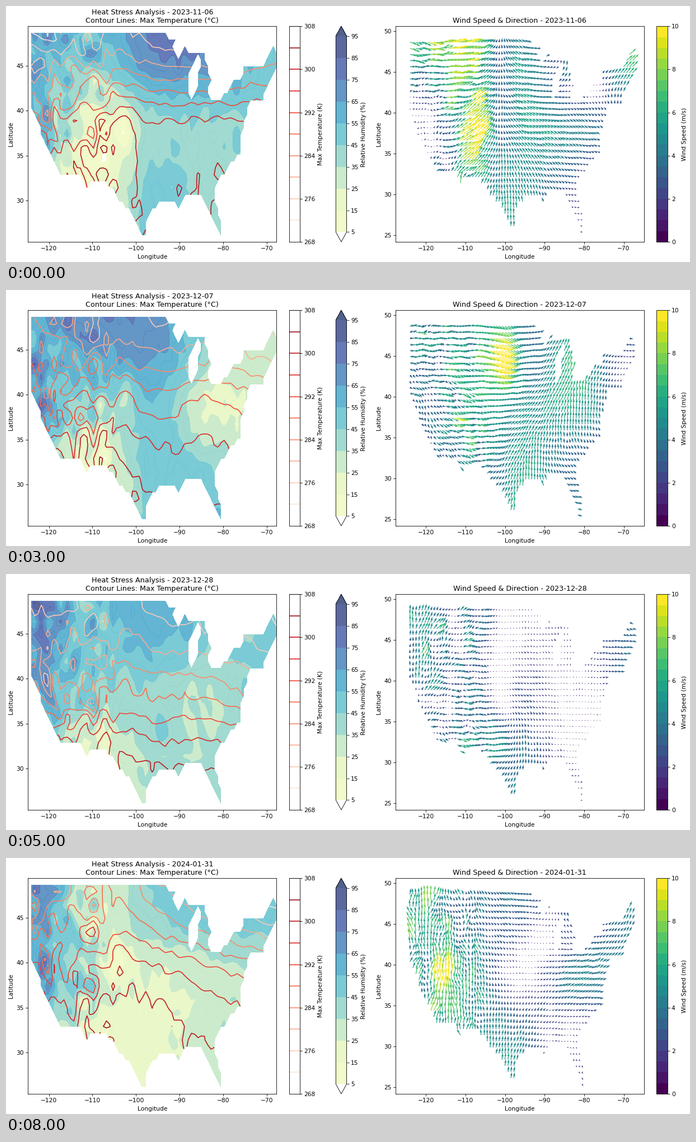
These frames come from a looping animation (1222 px wide and 458 px high, 9 s). A matplotlib script:

```python
import numpy as np
import matplotlib.pyplot as plt
from matplotlib.animation import FuncAnimation
from matplotlib.cm import ScalarMappable
from matplotlib.colors import BoundaryNorm, ListedColormap, Normalize
from matplotlib.path import Path

W, H, DPI = 1222, 458, 76.375

# Regular 0.75 degree grid, north to south
COLS, ROWS = np.arange(77.0), np.arange(33.0)
lon, lat = -124.77 + 0.75 * COLS, 49.4 - 0.75 * ROWS
LON, LAT = np.meshgrid(lon, lat)

# Outlines in grid steps (column, row)
LAND = [(1, 1), (42, 1), (45, 2), (44, 3), (46, 4.5), (48, 3), (49, 4), (54, 4),
        (56, 8), (55, 10.5), (58, 11), (63, 8), (65, 8), (66, 6), (72, 6), (75, 3),
        (76, 4), (76, 6), (73, 9), (72, 11), (68, 11), (65, 17), (65, 19), (57, 24),
        (59, 29), (59, 32), (56, 28), (53, 25.5), (48, 25.5), (46, 27), (41, 26),
        (36, 29), (36, 31), (34.5, 31), (33, 29), (28, 26), (23, 23), (18, 24),
        (15, 22), (10, 22), (4, 16), (1, 12.5), (1, 2)]
LAKE = [(51.6, 4.5), (52.5, 5), (50.5, 10.5), (49.6, 10.5), (49.6, 7.5)]

nodes = np.array([(c, r) for r in ROWS for c in COLS])
land = Path(LAND)
inside = land.contains_points(nodes, radius=0.2) | land.contains_points(nodes, radius=-0.2)
inside &= ~Path(LAKE).contains_points(nodes)
inside = inside.reshape(LON.shape)


def weights(x, knots):
    """Cubic convolution weights from evenly spaced knots to x."""
    t = abs((x[:, None] - knots) / (knots[1] - knots[0]))
    w = np.where(t < 1, 1.5 * t**3 - 2.5 * t**2 + 1,
                 np.where(t < 2, -0.5 * t**3 + 2.5 * t**2 - 4 * t + 2, 0))
    return w / w.sum(1, keepdims=True)


WX, WY = weights(lon, np.linspace(-122, -70, 5)), weights(lat, np.linspace(47, 30, 3))
NX, NY = weights(COLS, np.arange(-2, 82, 2)), weights(ROWS, np.arange(-2, 38, 2))


def smooth(*rows):
    return WY @ np.array(rows, float) @ WX.T


def rough(rng):
    return NY @ rng.normal(size=(NY.shape[1], NX.shape[1])) @ NX.T


def blob(x, y, r):
    return np.exp(-((LON - x) ** 2 + (LAT - y) ** 2) / r**2)


# Mountain relief shared by all days
west = 1 / (1 + np.exp((LON + 105.5) / 0.9))
ridge = np.exp(-((LON + 118.6 + 0.75 * (LAT - 37)) / 0.8) ** 2 - ((LAT - 38.6) / 2.6) ** 4)
relief = rough(np.random.default_rng(4)) * west
north = (LAT - 28) / 10

days = {}


def day(n, date, hum, warmth, u, v, spot, gust):
    """Rows run north to south, columns west to east; warmth is north, mid, eastward tilt."""
    x, y, amp = spot
    hum = smooth(*hum) + amp * blob(x, y, 2.2)
    top, mid, tilt = warmth
    temp = (WY @ [top, mid, 300.5])[:, None] + tilt * north * (LON + 96) / 10
    temp = temp - 4.5 * west * north.clip(0, 1) - (0.07 + 0.08 * north) * (hum - 35)
    gx, gy, gu, gv = gust
    g = blob(gx, gy, 3.5)
    days[n] = date, [hum, temp, smooth(*u) + gu * g, smooth(*v) + gv * g]


def between(n, date):
    a, b = days[n - 1][1], days[n + 1][1]
    days[n] = date, [(p + q) / 2 for p, q in zip(a, b)]


day(0, "2023-11-06",
    hum=([62, 50, 75, 75, 50], [55, 18, 42, 42, 48], [25, 14, 50, 40, 50]),
    warmth=(285, 298, 0),
    u=([6, 8, -4, 0, 5], [-1, 5, -4, -4, -2], [3, 3, -1, -2, 0]),
    v=([0, 2, 3, -4, 5], [0, 3, 3, 2, 2], [2, 4, 5, 1, -2]),
    spot=(-102.5, 38, -22), gust=(-108, 38, 4, 4))

day(1, "2023-11-17",
    hum=([72, 28, 14, 28, 52], [62, 38, 10, 38, 55], [35, 25, 30, 40, 50]),
    warmth=(286, 294, -3),
    u=([1, 2, 1, 5, 4], [0, 3, -2, 1, 2], [2, 3, 0, 1, 1]),
    v=([3, 2, 1, -1, -3], [5, 2, 3, -2, -3], [3, 3, 0, -4, -4]),
    spot=(-100.6, 31.8, 50), gust=(-120, 39.5, 1, 4))

day(3, "2023-12-07",
    hum=([62, 72, 70, 45, 35], [60, 38, 55, 22, 28], [22, 14, 50, 50, 45]),
    warmth=(285, 294, -2),
    u=([4, 5, 4, 2, 3], [2, 6, 4, 1, -1], [2, 4, 1, -3, -3]),
    v=([0, 0, -1, 6, 0], [-2, -2, 3, 6, 3], [-2, -1, 6, 2, 1]),
    spot=(-102, 40, -18), gust=(-101.5, 45, 5, -5))

day(4, "2023-12-18",
    hum=([80, 42, 48, 45, 50], [65, 28, 20, 26, 55], [40, 20, 28, 30, 50]),
    warmth=(282, 290, -3),
    u=([0, 3, 2, 4, 4], [1, 3, 1, 4, 5], [2, 2, 1, 4, 1]),
    v=([4, 1, 3, 2, 2], [5, 2, 5, -1, -3], [3, 1, 2, -3, -5]),
    spot=(-103.3, 39.7, -20), gust=(-121, 41, 0, 4))

day(6, "2024-01-07",
    hum=([64, 60, 78, 58, 42], [50, 62, 66, 42, 45], [14, 18, 45, 45, 42]),
    warmth=(282, 287, 0),
    u=([2, 3, -3, -3, 3], [0, 4, -5, -4, 0], [2, 6, 0, -6, -4]),
    v=([4, 1, -1, 1, -4], [1, -3, -3, 2, 3], [-3, -3, 6, 3, 1]),
    spot=(-94, 34.2, 20), gust=(-102, 33, 6, -1))

day(8, "2024-01-31",
    hum=([68, 28, 45, 52, 52], [56, 32, 24, 30, 38], [35, 20, 22, 32, 42]),
    warmth=(285, 296, -2),
    u=([0, -1, -3, 1, 2], [1, -1, 0, 4, 3], [2, 0, 1, 1, 1]),
    v=([6, 3, 1, -3, 4], [5, 5, 1, 2, 2], [4, 5, 4, -1, -2]),
    spot=(-104, 40.3, -20), gust=(-115, 38, 0, 5))

between(2, "2023-11-27")
between(5, "2023-12-28")
between(7, "2024-01-18")


def weather(n):
    """Date, humidity, temperature and wind of one day, with local detail."""
    date, (hum, temp, u, v) = days[n]
    rng = np.random.default_rng(100 + n)
    r = [rough(rng) for _ in days[n][1]]
    hum = hum + r[0] * (2 + 5 * west) - 5 * relief + 14 * ridge
    temp = temp + r[1] * (0.5 + 0.9 * west) + 2.2 * relief - 6 * ridge
    u, v = (f + e * (0.4 + 0.9 * west) for f, e in zip((u, v), r[2:]))
    hide = ~inside
    return date, np.ma.array(hum.clip(1, 99), mask=hide), np.ma.array(temp, mask=hide), u, v


HUM_LEVELS = np.arange(5, 100, 5)
TEMP_LEVELS = np.arange(268, 309, 4)
blues, reds = plt.get_cmap("YlGnBu"), plt.get_cmap("Reds")
speeds = plt.get_cmap("viridis", 20)


def pale(x):
    return tuple(0.3 + 0.7 * c for c in blues(x)[:3])


# Neighbouring five-percent bands share a tone
tones = [max(0.13, (k + 0.5) / 9) for k in range(9)]
HUM_COLORS = ["white"] + [pale(x) for x in tones for _ in "ab"] + [pale(1.0)]
LINE_COLORS = [blues((h - 5) / 90) for h in HUM_LEVELS]

fig = plt.figure(figsize=((W + 0.001) / DPI, (H + 0.001) / DPI), dpi=DPI, facecolor="white")


def panel(x0, x1, y0=36.3, y1=422):
    return fig.add_axes([x0 / W, 1 - y1 / H, (x1 - x0) / W, (y1 - y0) / H])


heat, wind = panel(39.4, 483.2), panel(696.3, 1139.5)
temp_bar, hum_bar, speed_bar = panel(505.5, 525), panel(589.3, 608.5), panel(1162, 1181.5)

temp_bar.set(xlim=(0, 1), ylim=(268, 308), xticks=[], yticks=TEMP_LEVELS[::2])
temp_bar.yaxis.tick_right()
temp_bar.yaxis.set_label_position("right")
temp_bar.set_ylabel("Max Temperature (K)")
temp_bar.hlines(TEMP_LEVELS, 0, 1, linewidth=1.5,
                colors=[reds((t - 268) / 40) for t in TEMP_LEVELS])

hum_norm = BoundaryNorm(HUM_LEVELS, len(HUM_COLORS), extend="both")
cb = fig.colorbar(ScalarMappable(hum_norm, ListedColormap(HUM_COLORS)), cax=hum_bar,
                  ticks=HUM_LEVELS[::2], label="Relative Humidity (%)")
cb.minorticks_off()
speed_norm = Normalize(0, 10)
fig.colorbar(ScalarMappable(speed_norm, speeds), cax=speed_bar,
             ticks=range(0, 11, 2), label="Wind Speed (m/s)")


def frame(ax, pad_x, pad_y, yticks, title):
    ax.set(xlim=(lon[0] - pad_x, lon[-1] + pad_x), ylim=(lat[-1] - pad_y, lat[0] + pad_y),
           xticks=range(-120, -69, 10), yticks=yticks,
           xlabel="Longitude", ylabel="Latitude")
    ax.set_title(title)


def draw(n):
    date, hum, temp, u, v = weather(n)

    heat.clear()
    heat.contourf(lon, lat, hum, HUM_LEVELS, colors=HUM_COLORS, extend="both")
    heat.contour(lon, lat, hum, HUM_LEVELS, colors=LINE_COLORS, linewidths=0.4, alpha=0.6)
    heat.contour(lon, lat, temp, TEMP_LEVELS, cmap=reds, linewidths=1.5)
    frame(heat, 0, 0, range(30, 46, 5),
          f"Heat Stress Analysis - {date}\nContour Lines: Max Temperature (°C)")

    wind.clear()
    us, vs = u[inside], v[inside]
    wind.quiver(LON[inside], LAT[inside], us, vs, np.hypot(us, vs), cmap=speeds,
                norm=speed_norm, scale=205, width=0.0029)
    frame(wind, 2.85, 1.2, range(25, 51, 5), f"Wind Speed & Direction - {date}")
    return []


anim = FuncAnimation(fig, draw, frames=9, interval=1000, repeat=True, repeat_delay=0)
plt.show()
```
